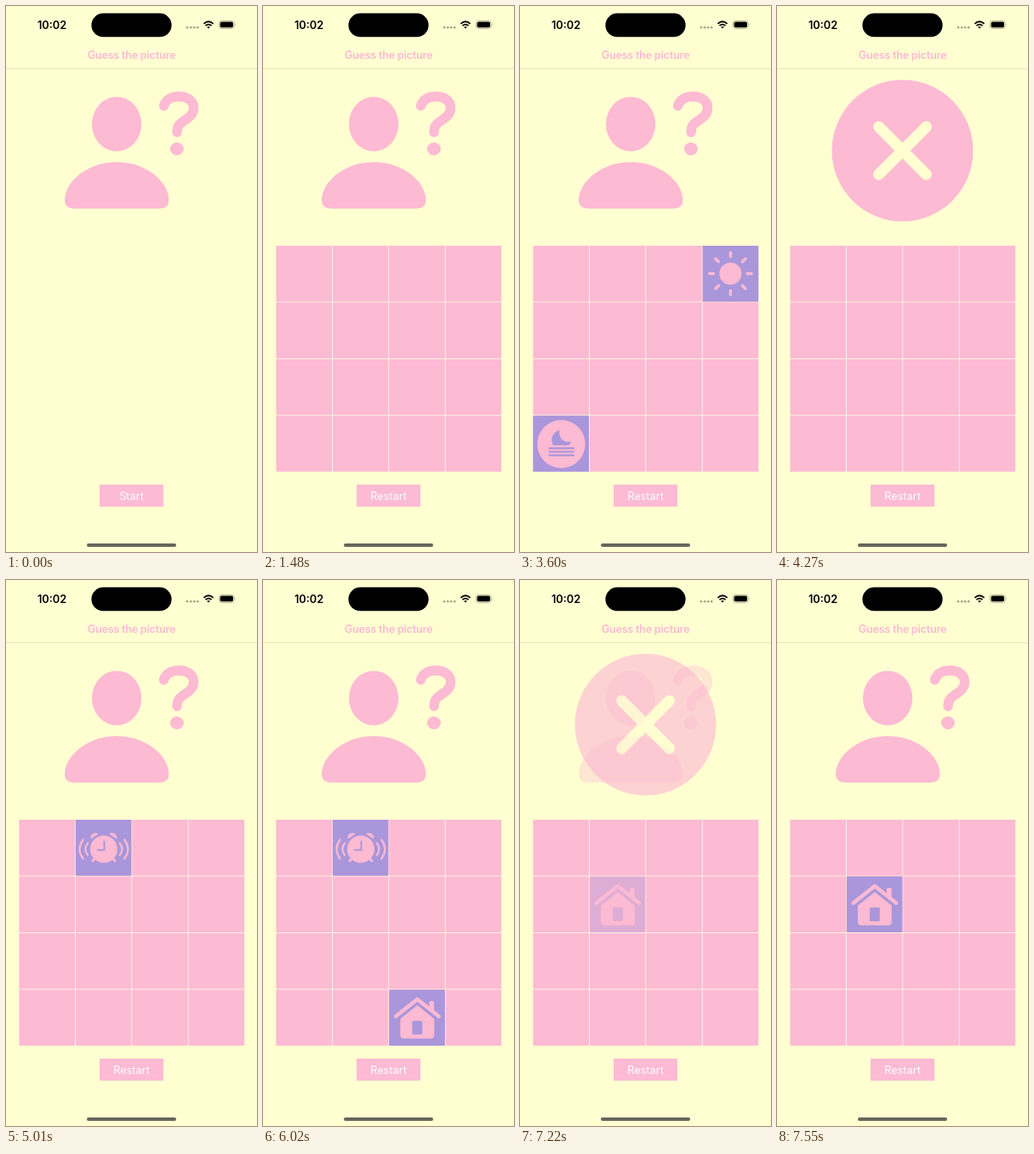
Write an HTML page that moves like this. It is 295 px wide and 640 px high and loops after 8 s.

```html
<!DOCTYPE html>
<html lang="en">
<head>
<meta charset="utf-8">
<title>Guess the picture</title>
<style>
  html, body { margin: 0; width: 100%; height: 100%; overflow: hidden; background: #ffffd2; }
  svg { display: block; width: 100%; height: 100%; }
  text { font-family: Inter, Roboto, sans-serif; font-size: 12.75px; text-anchor: middle; }
  .pink { fill: #fcbad3; }
  .cream { fill: #ffffd2; }
  .violet { fill: #aa96da; }
  .line { fill: none; stroke: #fcbad3; stroke-linecap: round; stroke-linejoin: round; }
  .cut { stroke: #aa96da; }
</style>
</head>
<body>
<svg viewBox="0 0 295 640" xmlns="http://www.w3.org/2000/svg">
  <defs>
    <g id="moon">
      <circle class="pink" cx="33.1" cy="33.3" r="28.2"/>
      <path class="violet" d="M31.1 16.8C24.6 18.8 21.1 24.8 22.1 31Q22.6 34.8 24.6 34.8H41.6Q44.1 33.3 45.1 30.3C36.6 32.3 29.6 26.8 31.1 16.8Z"/>
      <path class="line cut" stroke-width="2.1" d="M19 38.2H47.6M19 42.3H47.6M19 46.4H47.6"/>
    </g>
    <g id="alarm">
      <circle class="pink" cx="33.1" cy="34.5" r="16"/>
      <path class="pink" d="M18 22.5C16.5 17.5 22 13.5 27 16.5ZM48.2 22.5C49.7 17.5 44.2 13.5 39.2 16.5Z"/>
      <path class="line" stroke-width="2.8" d="M23 45L20 48.3M43.2 45L46.2 48.3"/>
      <path class="line cut" stroke-width="2" d="M33.7 25.5V35.6H26"/>
      <path class="line" stroke-width="2.2" d="M14.3 27.5Q8.7 34.5 14.3 41.5M8.8 23.5Q.5 34.5 8.8 45.5M51.9 27.5Q57.5 34.5 51.9 41.5M57.4 23.5Q65.7 34.5 57.4 45.5"/>
    </g>
    <g id="house">
      <path class="line" stroke-width="4.3" d="M7.8 31.3L33.1 11.3L58.4 31.3"/>
      <path class="pink" d="M47.2 14.5Q47.2 13.5 48.2 13.5H51.8Q52.8 13.5 52.8 14.5V26L47.2 21.5Z"/>
      <path class="pink" d="M33.1 18.3L53 34V53Q53 57.3 48.7 57.3H17.5Q13.2 57.3 13.2 53V34Z"/>
      <rect class="violet" x="27.2" y="36.6" width="11.8" height="16" rx="1"/>
    </g>
    <g id="sun">
      <circle class="pink" cx="32.8" cy="32.8" r="13"/>
      <path class="line" stroke-width="3.4" d="M32.8 8V13M32.8 52.6V57.6M8 32.8H13M52.6 32.8H57.6M15.3 15.3L18.8 18.8M46.8 46.8L50.3 50.3M15.3 50.3L18.8 46.8M46.8 18.8L50.3 15.3"/>
    </g>
  </defs>

  <rect class="cream" width="295" height="640"/>

  <text x="54" y="26.6" font-weight="600">10:02</text>
  <rect x="100.4" y="8.6" width="94.2" height="27.6" rx="13.8"/>
  <g fill="#a9a98b">
    <circle cx="213" cy="25.2" r="1.35"/><circle cx="217.2" cy="25.2" r="1.35"/>
    <circle cx="221.2" cy="25.2" r="1.35"/><circle cx="225.2" cy="25.2" r="1.35"/>
  </g>
  <g fill="none" stroke="#000" stroke-width="1.8">
    <path d="M232.4 20.9Q238 15.6 243.6 20.9M234.5 23.2Q238 20 241.5 23.2"/>
    <path d="M236.2 24.7Q238 23.2 239.8 24.7L238 26.5Z" fill="#000" stroke="none"/>
  </g>
  <rect x="250.3" y="17.3" width="18" height="9.2" rx="3" fill="none" stroke="#a9a98b" stroke-width=".8"/>
  <rect x="251.6" y="18.6" width="15.4" height="6.6" rx="1.8"/>
  <path d="M269.5 20.4Q271 21.9 269.5 23.4Z" fill="#a9a98b"/>

  <text class="pink" x="147.4" y="61.5" font-weight="600" letter-spacing="-.3">Guess the picture</text>
  <rect y="73" width="295" height=".7" fill="#dadab6"/>

  <g id="guess">
    <ellipse class="pink" cx="130.1" cy="138.4" rx="29.1" ry="32"/>
    <path class="pink" d="M130.2 183C166 183 191.4 207 191.4 227.5C191.4 234 187.5 237.4 180 237.4H80.4C73 237.4 69 234 69 227.5C69 207 94.4 183 130.2 183Z"/>
    <path class="line" stroke-width="11.4" d="M185.5 117C188 109 195.5 106 203.5 106C213.5 106 220.5 111.5 220.5 119.5C220.5 128 213.5 131.5 208.5 135C202.5 139 201 142 201 148"/>
    <ellipse class="pink" cx="200.9" cy="167.5" rx="8" ry="7.6"/>
  </g>
  <g id="wrong">
    <circle class="pink" cx="147.5" cy="169.5" r="83"/>
    <path d="M119.6 141.6L175.4 197.4M175.4 141.6L119.6 197.4" stroke="#ffffd2" stroke-width="13" stroke-linecap="round"/>
  </g>

  <g id="board"></g>

  <rect class="pink" x="110" y="561" width="75" height="25.8"/>
  <text id="label" x="147.5" y="578.6" fill="#fff"></text>
  <rect x="95" y="630.1" width="105" height="3.8" rx="1.9" fill="#66665a"/>
</svg>
<script>
  const LOOP = 8000, GRID_AT = 1480;
  const PITCH = 66.4, SIZE = 65.6;
  const $ = id => document.getElementById(id);

  // Each turn fades in over a few discrete steps and closes at once.
  const turns = [
    { icon: 'moon', row: 3, col: 0, from: 2510, to: 2730, steps: 3, close: 4270 },
    { icon: 'sun', row: 0, col: 3, from: 3150, to: 3600, steps: 5, close: 4270 },
    { icon: 'alarm', row: 0, col: 1, from: 4670, to: 5010, steps: 4, close: 6790 },
    { icon: 'house', row: 3, col: 2, from: 5800, to: 6020, steps: 3, close: 6790 },
    { icon: 'house', row: 1, col: 1, from: 7110, to: 7550, steps: 5, close: LOOP }
  ];
  const misses = [{ at: 4270, next: turns[2] }, { at: 6790, next: turns[4] }];

  function add(parent, name, attrs) {
    const node = document.createElementNS('http://www.w3.org/2000/svg', name);
    for (const key in attrs) node.setAttribute(key, attrs[key]);
    return parent.appendChild(node);
  }

  const square = (parent, cls, x, y) =>
    add(parent, 'rect', { class: cls, x, y, width: SIZE, height: SIZE });

  const board = $('board');
  add(board, 'rect', { x: 15.4, y: 281, width: 264.8, height: 264.8, fill: '#ffffe4' });
  for (let i = 0; i < 16; i++)
    square(board, 'pink', 15.4 + i % 4 * PITCH, 281 + (i >> 2) * PITCH);

  for (const turn of turns) {
    const x = 15.4 + turn.col * PITCH, y = 281 + turn.row * PITCH;
    turn.node = add(board, 'g', { transform: `translate(${x} ${y})` });
    square(turn.node, 'violet', 0, 0);
    add(turn.node, 'use', { href: '#' + turn.icon });
  }

  const ease = p => p * p * (3 - 2 * p);

  function fade(t, { from, to, steps }) {
    if (t < from) return 0;
    if (t >= to) return 1;
    const step = Math.floor((t - from) / (to - from) * (steps - 1)) + 1;
    return ease(step / steps);
  }

  function show(node, alpha) {
    node.setAttribute('opacity', alpha);
    node.setAttribute('visibility', alpha > 0 ? 'visible' : 'hidden');
  }

  function render(t) {
    const started = t >= GRID_AT;
    board.setAttribute('display', started ? 'inline' : 'none');
    $('label').textContent = started ? 'Restart' : 'Start';
    for (const turn of turns) show(turn.node, t < turn.close ? fade(t, turn) : 0);

    const miss = misses.findLast(m => t >= m.at);
    const wrong = miss ? 1 - fade(t, miss.next) : 0;
    show($('wrong'), wrong);
    show($('guess'), 1 - wrong);
  }

  const begin = performance.now();
  function tick() {
    render((performance.now() - begin) % LOOP);
    requestAnimationFrame(tick);
  }
  tick();
</script>
</body>
</html>
```
